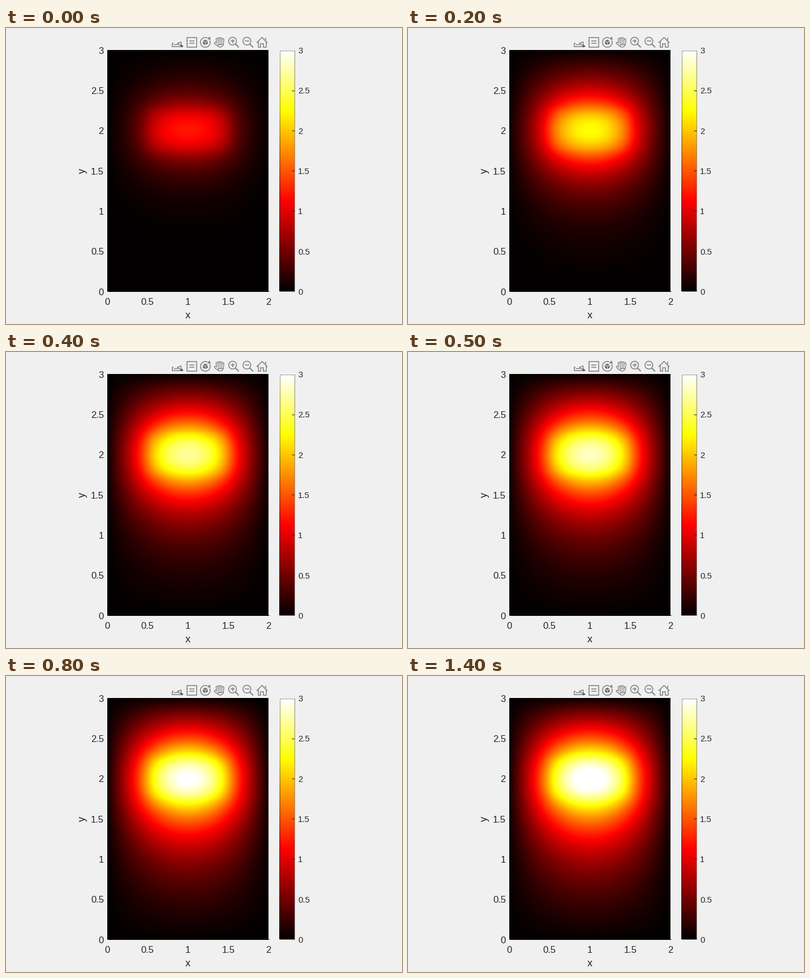
Animation of 700 by 525 pixels, one loop 1500 ms. Source, as a matplotlib script:

```python
import numpy as np
import matplotlib.pyplot as plt
from matplotlib.animation import FuncAnimation
from matplotlib.colors import ListedColormap
from matplotlib.patches import Circle, FancyArrowPatch, Rectangle, RegularPolygon

W, H, DPI = 700, 525, 100
PX = 72 / DPI
INK, GREY, BACK = "#262626", "#7d7d7d", "#f0f0f0"
LEFT, RIGHT, TOP, BOTTOM = 179, 464, 39, 467
BAR_LEFT, BAR_RIGHT = 483, 510
WIDTH, HEIGHT, LIMIT = 2, 3, 3
UNIT = 142.6
FRAMES = 15

plt.rcParams["font.family"] = "Liberation Sans"
fig = plt.figure(figsize=(W / DPI, H / DPI), dpi=DPI, facecolor=BACK)
ax = fig.add_axes([0, 0, 1, 1])


def line(*points, width=1.5, color=GREY, cap="butt"):
    xs, ys = zip(*points)
    ax.plot(xs, ys, color=color, lw=width * PX, solid_capstyle=cap,
            solid_joinstyle="miter")


def box(x, y, w, h, width=1.5, color=GREY):
    ax.add_patch(Rectangle((x, y), w, h, fill=False, ec=color, lw=width * PX))


def ngon(x, y, n, r, turn=0, color=GREY):
    ax.add_patch(RegularPolygon((x, y), n, radius=r, orientation=turn,
                                fc=color, ec="none"))


def label(x, y, text, size=16.6, **kw):
    ax.text(x, y, text, size=size * PX, color=INK, **kw)


# Heat equation on a plate with a heated rectangle, solved in a sine basis
# with implicit Euler steps. The cold rim lies one cell outside the plate.
STEP, POWER, CELL = 0.1, 25, 0.02


def hot_map(n=256):
    rise = n * 3 // 8
    i = np.arange(1, n + 1)
    rgb = [i / rise, (i - rise) / rise, (i - 2 * rise) / (n - 2 * rise)]
    return ListedColormap(np.clip(np.array(rgb).T, 0, 1))


def basis(length, modes, lo, hi, pixels):
    k = np.arange(1, modes + 1) * np.pi / (length + 2 * CELL)
    coef = np.cos(k * (lo + CELL)) - np.cos(k * (hi + CELL))
    coef *= 2 / (length + 2 * CELL) / k
    pos = (np.arange(pixels) + 0.5) / pixels * length + CELL
    return k ** 2, coef, np.sin(np.outer(pos, k))


kx, cx, sx = basis(WIDTH, 80, 0.49, 1.51, RIGHT - LEFT)
ky, cy, sy = basis(HEIGHT, 120, 1.745, 2.27, BOTTOM - TOP)
rate = ky[:, None] + kx
steady = POWER * np.outer(cy, cx) / rate


def heat(frame):
    modes = steady * (1 - (1 + STEP * rate) ** -(frame + 1.0))
    return sy @ modes @ sx.T


def draw_field(data, left, right):
    return ax.imshow(data, extent=(left, right, BOTTOM, TOP), origin="lower",
                     cmap=hot_map(), vmin=0, vmax=LIMIT, aspect="auto",
                     interpolation="nearest")


def draw_axes():
    line((LEFT, BOTTOM - 0.5), (RIGHT + 1, BOTTOM - 0.5), width=1, color="black")
    for v in np.arange(0, WIDTH + 0.5, 0.5):
        label(LEFT + v * UNIT, 491, f"{v:g}", ha="center")
    for v in np.arange(0, HEIGHT + 0.5, 0.5):
        y = BOTTOM - v * UNIT
        label(173, y + 6.5, f"{v:g}", ha="right")
        label(516, y + 6, f"{v:g}", size=15)
        if 0 < v < HEIGHT:
            line((BAR_RIGHT - 5, y), (BAR_RIGHT, y), width=1, color=INK)
    label(321.5, 515, "x", size=18.3, ha="center")
    label(135, 253, "y", size=18.3, ha="center", va="center", rotation=90)
    box(BAR_LEFT + 0.5, TOP + 0.5, BAR_RIGHT - BAR_LEFT - 1, BOTTOM - TOP - 1,
        width=0.5, color=INK)


def draw_export(x, y):
    line((x - 6, y + 1.5), (x - 8, y + 1.5), (x - 8, y + 7.5),
         (x + 6, y + 7.5), (x + 6, y + 4.5))
    ax.add_patch(FancyArrowPatch(
        (x - 5, y + 4), (x + 8, y - 1.5), connectionstyle="arc3,rad=0.35",
        arrowstyle="-|>,head_length=4,head_width=3", shrinkA=0, shrinkB=0,
        fc=BACK, ec=GREY, lw=1.4 * PX))
    ngon(x + 9, y + 7, 3, 3, np.pi / 4, "#4a4a4a")


def draw_panel(x, y):
    box(x - 8.5, y - 8.7, 17, 17.5)
    for dy in (-2, 2):
        line((x - 4.5, y + dy), (x + 5, y + dy))
    ngon(x - 9, y, 4, 2.6, color=BACK)
    for dy in (-3.5, 0.5):
        line((x - 9, y + dy), (x - 7, y + dy + 1.5), (x - 9, y + dy + 3),
             width=1.2)


def draw_rotate(x, y):
    a = np.radians(np.linspace(-25, 295, 50))
    line(*zip(x + 8.6 * np.cos(a), y + 8.6 * np.sin(a)))
    ngon(x + 7, y - 7, 3, 3.6, -0.8)
    ngon(x, y, 6, 5, color="#707070")
    for turn in np.radians([90, 210, 330]):
        line((x, y), (x + 4.5 * np.cos(turn), y + 4.5 * np.sin(turn)),
             width=1, color=BACK)


def draw_hand(x, y):
    """Fingers, thumb and palm as wide strokes with a lighter core."""
    for color, trim in ((GREY, 0), (BACK, 2.7)):
        for i in range(4):
            tip = y - 6.5 + 0.7 * (i - 1.3) ** 2
            line((x - 4 + 3.5 * i, tip), (x - 3 + 2.9 * i, y + 3),
                 width=4.6 - trim, color=color, cap="round")
        line((x - 7, y + 1.8), (x - 3, y + 5), width=4.6 - trim, color=color,
             cap="round")
        ax.add_patch(Circle((x + 1.5, y + 3.2), 6.3 - trim / 2, fc=color,
                            ec="none"))


def draw_zoom(x, y, plus):
    ax.add_patch(Circle((x, y), 6.9, fill=False, ec=GREY, lw=1.5 * PX))
    line((x + 4.9, y + 4.9), (x + 11, y + 11), width=2)
    line((x - 3.8, y), (x + 3.8, y))
    if plus:
        line((x, y - 3.8), (x, y + 3.8))


def draw_home(x, y):
    line((x - 9.6, y + 1), (x, y - 8.5), (x + 9.6, y + 1))
    for side in (-1, 1):
        line((x + 7 * side, y - 1), (x + 7 * side, y + 8.5),
             (x + 2.4 * side, y + 8.5), (x + 2.4 * side, y + 2.5), (x, y + 2.5))
    line((x + 6, y - 8.3), (x + 6, y - 3.3))


plate = draw_field(heat(0), LEFT, RIGHT)
draw_field(np.linspace(0, LIMIT, 256)[:, None], BAR_LEFT, BAR_RIGHT)
draw_axes()
draw_export(302, 25.2)
draw_panel(328, 25.2)
draw_rotate(352.3, 25.5)
draw_hand(377, 25)
draw_zoom(400.5, 23.3, plus=True)
draw_zoom(425.8, 23.3, plus=False)
draw_home(452.6, 25.3)

ax.set_xlim(0, W)
ax.set_ylim(H, 0)
ax.axis("off")


def update(frame):
    plate.set_data(heat(frame))
    return [plate]


anim = FuncAnimation(fig, update, frames=FRAMES, interval=100, repeat=True,
                     repeat_delay=0, blit=False)
plt.show()
```
